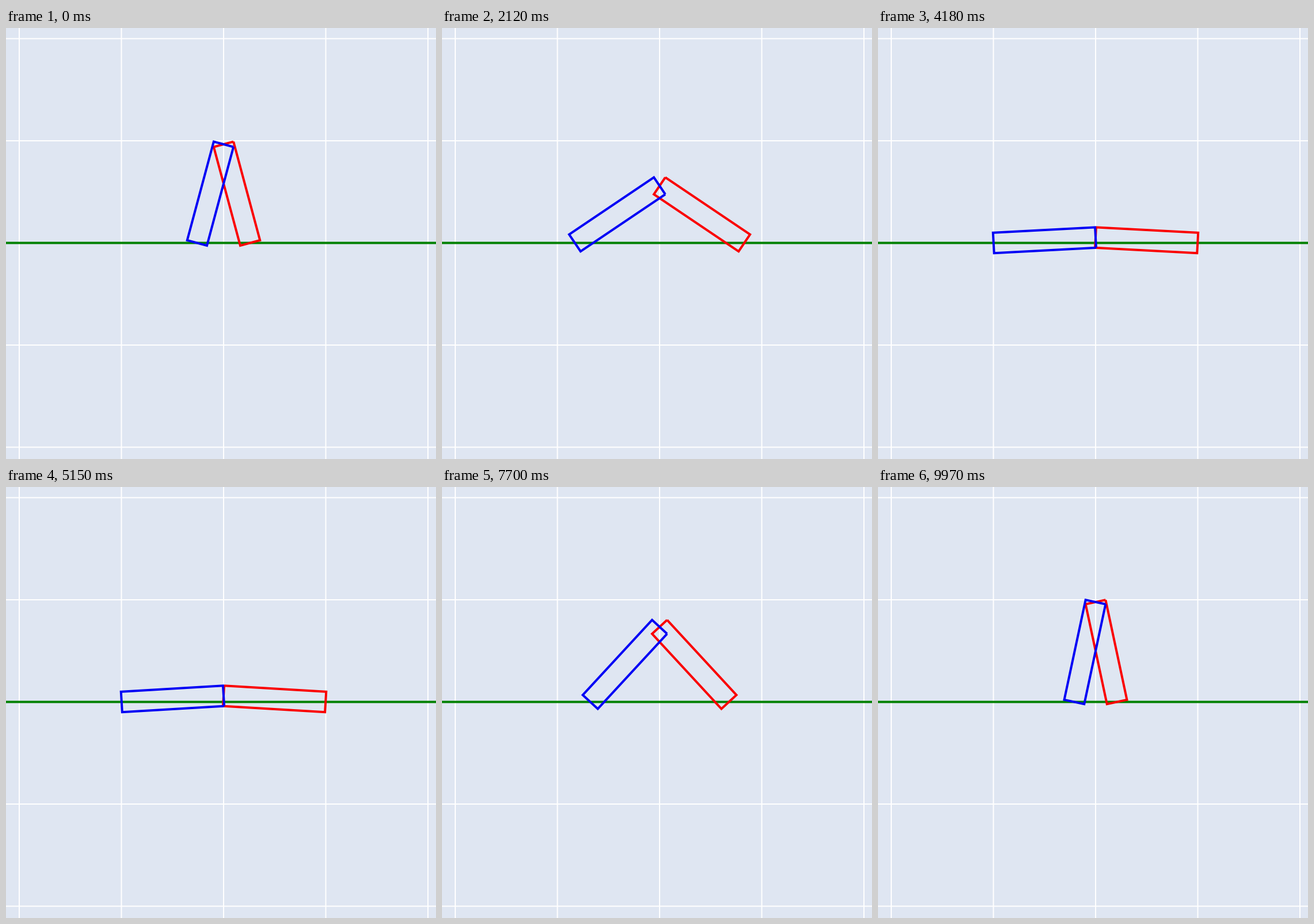
A matplotlib script for the animation above (10 s loop, 747 by 749 pixels).

```python
import numpy as np
import matplotlib.pyplot as plt
from matplotlib.animation import FuncAnimation

W, H, DPI = 747, 749, 100
FRAMES, LOOP_MS = 330, 10000
UNIT = 177.5              # grid spacing and leg length in pixels
HALF = UNIT / 10          # half the leg width
CX, FLOOR = 378, 373.5
PX = 72 / DPI             # one pixel in points

fig = plt.figure(figsize=(W / DPI, H / DPI), dpi=DPI, facecolor="#dfe6f2")
ax = fig.add_axes([0, 0, 1, 1])
ax.set_xlim(0, W)
ax.set_ylim(H, 0)
ax.axis("off")


def stroke(xs, ys, color, width, z):
    line, = ax.plot(xs, ys, color=color, lw=width * PX, zorder=z, snap=False,
                    solid_capstyle="butt", solid_joinstyle="miter")
    return line


for k in range(-2, 3):
    stroke([CX + k * UNIT] * 2, [0, H], "white", 2, 1)
    stroke([0, W], [FLOOR + k * UNIT] * 2, "white", 2, 1)
stroke([0, W], [FLOOR, FLOOR], "#008000", 4, 2)
red = stroke([], [], "#fa0000", 4, 3)
blue = stroke([], [], "#0000f5", 4, 4)


def lean(n):
    """Angle between a leg and the floor."""
    x = np.radians(1.045 * (n - 151.9))
    return np.radians(38.08 - 37.98 * np.cos(x) + 1.91 * np.cos(2 * x)
                      - 0.15 * np.cos(3 * x))


def leg(a, side, start):
    """Outline of one leg, open at the corner where the stroke starts."""
    along = UNIT * np.array([side * np.cos(a), np.sin(a)])
    across = start * HALF * np.array([side * np.sin(a), -np.cos(a)])
    top = np.array([CX, FLOOR - UNIT * np.sin(a)])
    foot = top + along
    return np.array([top + across, foot + across, foot - across,
                     top - across, top + across]).T


def update(n):
    a = lean(n)
    red.set_data(*leg(a, 1, 1))
    blue.set_data(*leg(a, -1, -1))
    return red, blue


anim = FuncAnimation(fig, update, frames=FRAMES, interval=LOOP_MS / FRAMES,
                     repeat=True, repeat_delay=0, blit=False)
plt.show()
```
